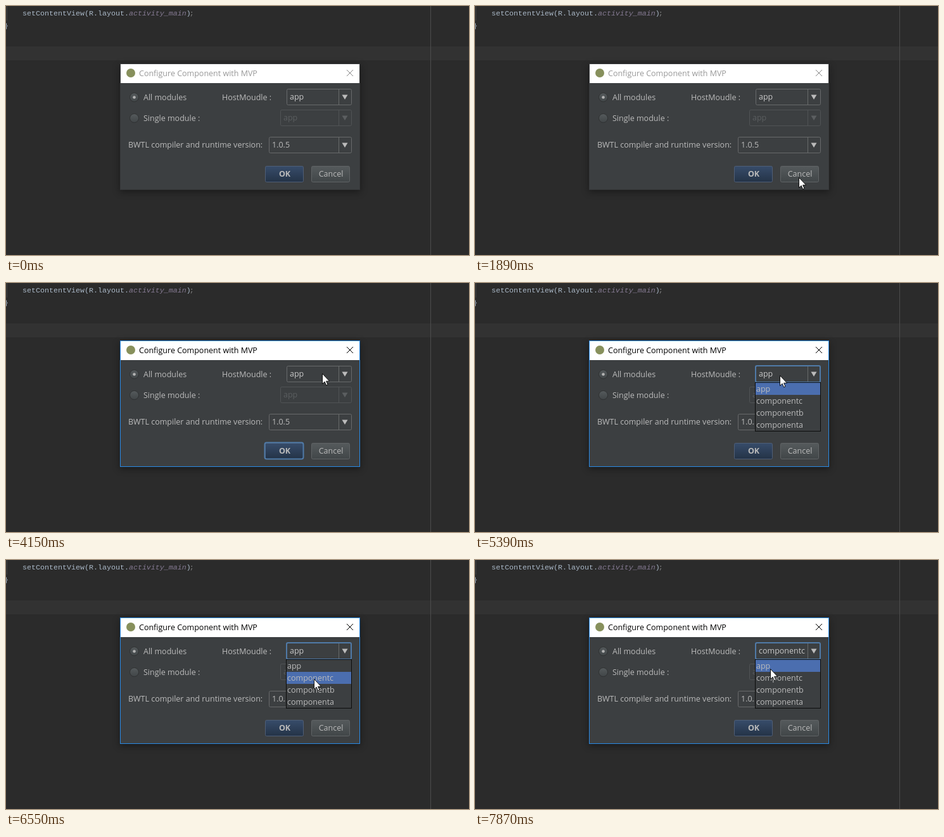
An HTML page that plays this animation: 731x394 px, repeating every 8000 ms.

```html
<!DOCTYPE html>
<html lang="en">
<head>
<meta charset="utf-8">
<title>Component dialog</title>
<style>
  html, body { margin: 0; width: 100%; height: 100%; overflow: hidden; background: #2b2b2b; }
  svg { display: block; width: 731px; height: 394px; }
  text { font: 12.5px "Open Sans", "Noto Sans", sans-serif; fill: #bbb; white-space: pre; }
  .code { font: 11.667px "Liberation Mono", monospace; fill: #a9b7c6; }
  .code .field { font-style: italic; fill: #857a92; }
  .code .end { fill: #858585; }
  .mid { text-anchor: middle; }
  .bold { font-weight: 700; }
  .dialog { filter: drop-shadow(0 3px 6px rgba(0, 0, 0, .42)); }
  .box { fill: #3c3f41; stroke: #686a6b; }
  .value { fill: #c8c8c8; }
  .arrow { fill: #bbb; }
  .disabled .box { stroke: #505355; }
  .disabled text, .disabled .arrow { fill: #5b5e60; }
  .radio { fill: url(#grey); stroke: #2e3031; }
  .glow { fill: none; stroke: #4f7aa8; stroke-width: 2; }
</style>
</head>
<body>
<svg viewBox="0 0 731 394">
  <defs>
    <linearGradient id="blue" x2="0" y2="1">
      <stop stop-color="#374c6a"/><stop offset="1" stop-color="#243347"/>
    </linearGradient>
    <linearGradient id="grey" x2="0" y2="1">
      <stop stop-color="#555a5c"/><stop offset="1" stop-color="#414648"/>
    </linearGradient>
  </defs>

  <rect width="731" height="394" fill="#2b2b2b"/>
  <rect y="64" width="731" height="22" fill="#323232"/>
  <rect x="670" width="1" height="394" fill="#4d4d4d"/>
  <rect x="1" width="1" height="23" fill="#3f3f3f"/>
  <text class="code" x="26" y="15">setContentView(R.layout.<tspan class="field">activity_main</tspan>)<tspan class="end" dx="-2">;</tspan></text>
  <text class="code" x="-3" y="35">}</text>

  <rect class="dialog" x="180" y="91" width="379" height="200" fill="#3c3f41"/>
  <rect x="181" y="92" width="377" height="30" fill="#fff"/>
  <rect id="frame" x="180.5" y="91.5" width="378" height="199" fill="none"/>
  <circle cx="197" cy="106" r="7" fill="#87905c"/>
  <text id="title" x="210" y="111">Configure Component with MVP</text>
  <path id="close" d="M538 101L548 111M548 101L538 111" fill="none"/>

  <circle class="radio" cx="202.5" cy="144.5" r="7"/>
  <circle cx="202.5" cy="144.5" r="2.3" fill="#b4b4b4"/>
  <circle class="radio" cx="202.5" cy="177.5" r="7"/>
  <text x="217" y="149">All modules</text>
  <text x="341" y="149">HostMoudle :</text>
  <text x="217" y="182">Single module :</text>
  <text x="193" y="224">BWTL compiler and runtime version:</text>
  <g id="combos"></g>
  <rect id="comboGlow" class="glow" x="443" y="131" width="102" height="26" rx="2"/>
  <text id="before" class="value" x="448" y="148">app</text>
  <text id="after" class="value" x="448" y="148">componentc</text>

  <rect x="409.5" y="253.5" width="60" height="25" rx="2" fill="url(#blue)" stroke="#4f5e76"/>
  <rect id="okGlow" class="glow" x="408.5" y="252.5" width="61" height="26" rx="3"/>
  <text class="mid bold" x="440" y="270">OK</text>
  <rect x="482.5" y="253.5" width="60" height="25" rx="2" fill="url(#grey)" stroke="#606466"/>
  <text class="mid" x="513" y="270">Cancel</text>

  <g id="popup">
    <rect x="442.5" y="157.5" width="103" height="77" fill="#3c3f41" stroke="#0c0c0c"/>
    <rect id="highlight" x="443" y="158" width="102" height="19" fill="#4b6eaf"/>
    <g id="items"></g>
  </g>

  <path id="cursor" d="M.5 .5V16.6L4.2 13.2L6.6 18.8L9 17.8L6.6 12.3H11.6Z"
        fill="#fff" stroke="#000" stroke-width=".9"/>
</svg>
<script>
const LOOP = 8000, TICK = 77, ROW = 19, LIST_TOP = 158;
const ENTER = 1040, ACTIVE = 3610, OPEN = 5070, PICK = 6950, REOPEN = 7640;
const $ = id => document.getElementById(id);

const combo = (x, y, label, cls = '') => `<g class="${cls}">
  <rect class="box" x="${x + .5}" y="${y + .5}" width="${545 - x}" height="25" rx="2"/>
  <path class="box" d="M525.5 ${y + 1}V${y + 25}"/>
  <path class="arrow" d="M530.5 ${y + 9.5}h9l-4.5 7.5z"/>
  <text x="${x + 5}" y="${y + 17}">${label}</text></g>`;
$('combos').innerHTML = combo(443, 131, '') + combo(433, 164, 'app', 'disabled') + combo(415, 207, '1.0.5');
$('items').innerHTML = ['app', 'componentc', 'componentb', 'componenta']
  .map((name, i) => `<text x="444" y="${172 + i * ROW}">${name}</text>`).join('');

// Each sweep of the pointer is one curve: first tick, last tick, control point, end point
const sweeps = [
  [ENTER, 1120, [247, 365], [248, 340]],
  [1270, 2040, [669, 266], [454, 270]],
  [2130, 2520, [434, 225], [453, 167]],
  [2690, 3380, [350, 186], [237, 208]],
  [ACTIVE, 4150, [340, 185], [499, 143]],
  [4300, 4920, [462, 322], [478, 134]],
  [5390, 5620, [485, 153], [485, 213]],
  [5790, 6240, [486, 165], [488, 225]],
  [6470, 6550, [487, 206], [486, 188]],
  [PICK, 7470, [482, 118], [470, 148]],
  [7790, 7870, [468, 160], [466, 172]]
];

const bezier = (a, b, c, u) => Math.round(a * (1 - u) ** 2 + 2 * b * u * (1 - u) + c * u * u);
let start = [247, 390];
const path = sweeps.flatMap(([from, to, bend, end]) => {
  const origin = start, gaps = Math.round((to - from) / TICK);
  start = end;
  return Array.from({ length: gaps + 1 }, (_, k) => {
    const [x, y] = [0, 1].map(axis => bezier(origin[axis], bend[axis], end[axis], (k + 1) / (gaps + 1)));
    return { t: from + (to - from) * k / gaps, x, y };
  });
});

// Each step is [time, value] and holds until the next one
function track(id, prop, first, ...steps) {
  const all = [[0, first], ...steps];
  const frames = [...all, [LOOP, all[all.length - 1][1]]]
    .map(([t, value]) => ({ offset: t / LOOP, [prop]: value, easing: 'step-end' }));
  $(id).animate(frames, { duration: LOOP, iterations: Infinity });
}

const shift = (x, y) => `translate(${x}px, ${y}px)`;
const rowShift = row => shift(0, row * ROW);

// While the list is open, the row under the pointer lights up, else the chosen one
const hover = (from, to, chosen) => [
  [from, rowShift(chosen)],
  ...path.filter(p => p.t > from && p.t < to)
    .map(p => [p.t, rowShift(p.y < LIST_TOP ? chosen : Math.floor((p.y - LIST_TOP) / ROW))])
];

track('cursor', 'transform', shift(0, 0), ...path.map(p => [p.t, shift(p.x, p.y)]));
track('cursor', 'opacity', 0, [ENTER, 1]);
track('highlight', 'transform', rowShift(0), ...hover(OPEN, PICK, 0), ...hover(REOPEN, LOOP, 1));
track('frame', 'stroke', '#37393b', [ACTIVE, '#2a8be6']);
track('title', 'fill', '#999', [ACTIVE, '#000']);
track('close', 'stroke', '#888', [ACTIVE, '#000']);
track('okGlow', 'opacity', 0, [ACTIVE, 1], [OPEN, 0]);
track('comboGlow', 'opacity', 0, [OPEN, 1]);
track('popup', 'opacity', 0, [OPEN, 1], [PICK, 0], [REOPEN, 1]);
track('before', 'opacity', 1, [PICK, 0]);
track('after', 'opacity', 0, [PICK, 1]);
</script>
</body>
</html>
```
